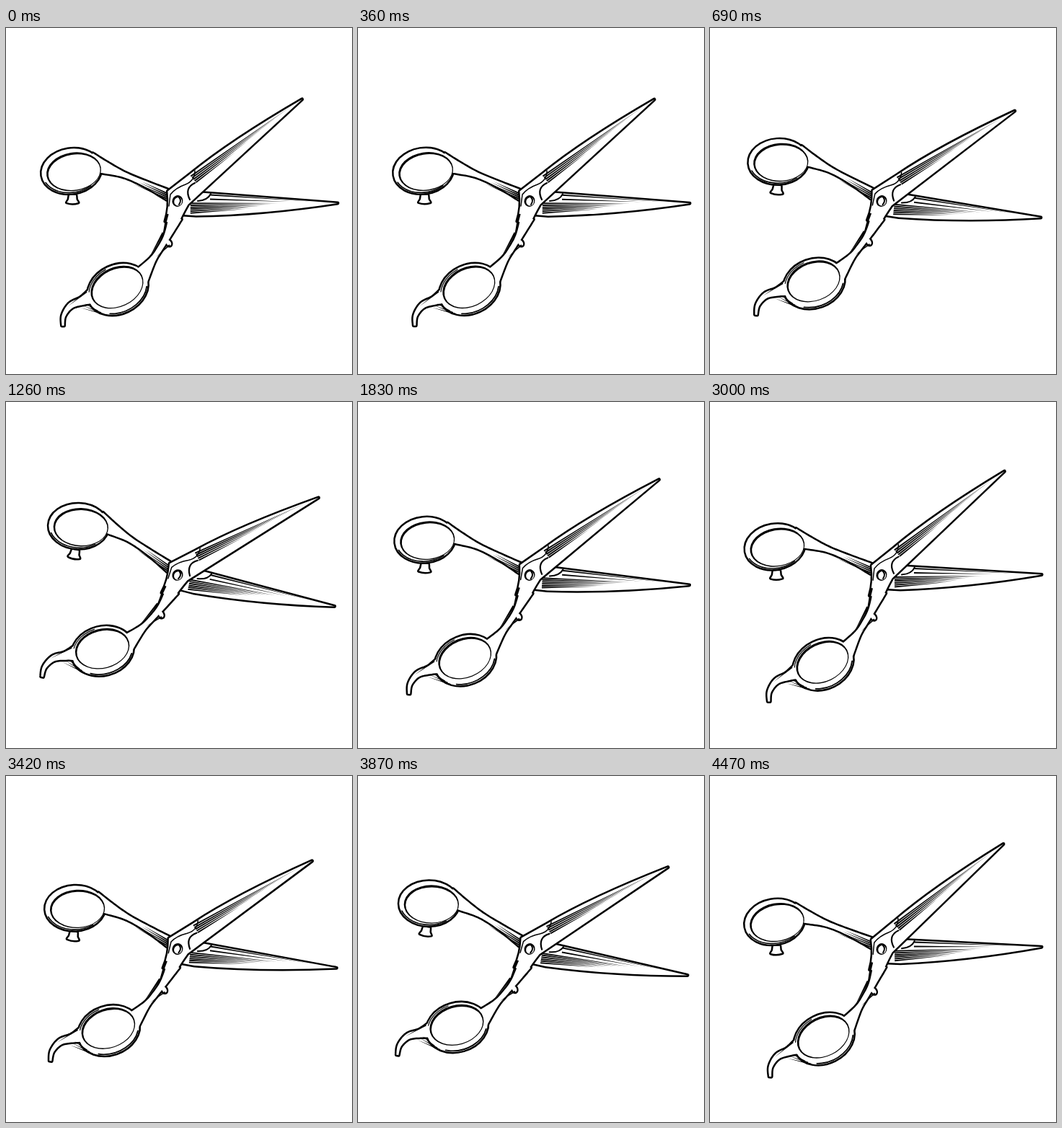
An HTML page with a canvas for the animation above (4500 ms loop, 480x480 px).

```html
<!DOCTYPE html>
<html>
<head>
<meta charset="utf-8">
<style>
html, body { margin: 0; width: 100%; height: 100%; overflow: hidden; background: #fff; }
canvas { display: block; width: 480px; height: 480px; }
</style>
</head>
<body>
<canvas id="stage" width="480" height="480"></canvas>
<script>
const ctx = document.getElementById('stage').getContext('2d');
const LOOP = 4500, STEP = 30, OUTLINE = 2.5;
const PIVOT = { x: 238, y: 240 };
const FRONT_ANGLE = -39.25, BACK_ANGLE = 0.77;
const rad = deg => deg * Math.PI / 180;

// Key poses of the sway: [ms, counter-clockwise degrees]
const SWAY = [
  [0, 0], [180, 1.3], [690, -5.2], [1080, -8.75], [1380, -11.1], [1620, -8.9], [1830, -2.85],
  [2300, 6.5], [2700, 3], [3000, 0.9], [3240, -2.55], [3710, -10], [4470, 1.5]
];

// Speed at a key pose; zero where the sway turns around
function speed(i) {
  const a = SWAY[i - 1], b = SWAY[i], c = SWAY[i + 1];
  if (!a || !c || (b[1] - a[1]) * (c[1] - b[1]) < 0) return 0;
  return (c[1] - a[1]) / (c[0] - a[0]);
}

function swayAt(t) {
  let i = 0;
  while (i < SWAY.length - 2 && t > SWAY[i + 1][0]) i++;
  const [t0, a] = SWAY[i], [t1, b] = SWAY[i + 1];
  const span = t1 - t0, u = (t - t0) / span, v = 1 - u;
  return v * v * (1 + 2 * u) * a + u * u * (3 - 2 * u) * b
    + span * u * v * (v * speed(i) - u * speed(i + 1));
}

function oval(x, y, rx, ry, deg, from = 0, to = 360) {
  const p = new Path2D();
  p.ellipse(x, y, rx, ry, rad(deg), rad(from), rad(to));
  return p;
}

function mix(a, b, c, d, u) {
  return b + u / 2 * (c - a + u * (2 * a - 5 * b + 4 * c - d + u * (3 * (b - c) + d - a)));
}

// Smooth band through [x, y, half width] knots
function band(...knots) {
  const at = s => {
    const i = Math.min(Math.floor(s), knots.length - 2);
    const k = n => knots[Math.max(0, Math.min(knots.length - 1, i + n))];
    return [0, 1, 2].map(c => mix(k(-1)[c], k(0)[c], k(1)[c], k(2)[c], s - i));
  };
  const left = [], right = [], end = knots.length - 1;
  for (let s = 0; s <= end + 0.01; s += 0.1) {
    const [x, y, w] = at(Math.min(s, end));
    const [ax, ay] = at(Math.max(0, s - 0.05)), [bx, by] = at(Math.min(end, s + 0.05));
    const dir = Math.atan2(by - ay, bx - ax);
    left.push([x + w * Math.sin(dir), y - w * Math.cos(dir)]);
    right.unshift([x - w * Math.sin(dir), y + w * Math.cos(dir)]);
  }
  const p = new Path2D();
  left.concat(right).forEach(q => p.lineTo(...q));
  p.closePath();
  return p;
}

// Blade drawn along the x axis from the pivot
function blade(angle, d) {
  const p = new Path2D();
  p.addPath(new Path2D(d), new DOMMatrix().translate(PIVOT.x, PIVOT.y).rotate(angle));
  return p;
}

const back = {
  blade: blade(BACK_ANGLE, 'M0-14L32-12L222 0Q120 17 26 20L8 19Z'),
  arm: band([116, 186, 13], [138, 194, 8], [165, 204, 3.5], [195, 217, 4], [226, 232, 7]),
  ring: oval(90.5, 198.5, 41.3, 31, -9),
  knob: new Path2D('M88 232L87 238L84.5 242Q92 244.5 100 242L97.5 238L97 232Z')
};

const front = {
  blade: blade(FRONT_ANGLE, 'M-2-19L38-18Q110-18 223 0L8 13Q-10 20-21 26L-31 11Q-14 0-2-19Z'),
  shank: band([235, 262, 9], [224, 288, 4.5], [213, 307, 3.5], [203, 322, 4.5], [186, 346, 12]),
  bump: oval(225.5, 298, 4.5, 3, 55),
  ring: oval(155, 362.5, 43, 33.5, -25),
  tail: band([79, 413, 1.5], [80, 399, 2.5], [90, 385, 4], [107, 378, 6], [128, 368, 14])
};

function solid(shapes) {
  ctx.lineWidth = 2 * OUTLINE;
  shapes.forEach(s => ctx.stroke(s));
  paint('#fff', ...shapes);
}

function paint(color, ...shapes) {
  ctx.fillStyle = color;
  shapes.forEach(s => ctx.fill(s));
  ctx.fillStyle = '#000';
}

function line(path, width) {
  ctx.lineWidth = width;
  ctx.stroke(typeof path === 'string' ? new Path2D(path) : path);
}

// Opening with a heavier rim at the upper left
function hole(x, y, rx, ry, deg) {
  paint('#000', oval(x, y, rx, ry, deg));
  paint('#fff', oval(x + 0.7, y + 0.8, rx - 2, ry - 2.2, deg));
}

// Hatch stroke that narrows to a point
function taper(x0, y0, x1, y1, w) {
  const dir = Math.atan2(y1 - y0, x1 - x0);
  const nx = -Math.sin(dir) * w / 2, ny = Math.cos(dir) * w / 2;
  ctx.beginPath();
  ctx.moveTo(x0 + nx, y0 + ny);
  ctx.lineTo(x1, y1);
  ctx.lineTo(x0 - nx, y0 - ny);
  ctx.fill();
}

// Hatching that runs towards the blade tip
function hatch(angle, count, x, y, gap, reach, shrink) {
  ctx.save();
  ctx.translate(PIVOT.x, PIVOT.y);
  ctx.rotate(rad(angle));
  for (let i = 0; i < count; i++) {
    const y0 = y + i * gap, x1 = reach - i * shrink;
    taper(x, y0, x1, y0 * (1 - x1 / 235), 2);
  }
  ctx.restore();
}

function drawBack() {
  solid([back.knob]);
  solid([back.blade, back.arm, back.ring]);
  hole(94, 199.3, 38.2, 26.7, -9);
  line(oval(91, 198.5, 40.5, 29.8, -9, 55, 160), 1.6);
  for (let i = 0; i < 4; i++) taper(225, 230 + i * 2.5, 188 - i * 4, 213 + i, 2);
  line('M284 230Q280 239 266 240', 2);
  hatch(BACK_ANGLE, 6, 18, 3, 2.7, 140, 9);
  hatch(BACK_ANGLE, 2, 45, -9, 6, 185, 30);
}

function drawFront() {
  solid([front.blade, front.shank, front.bump, front.tail, front.ring]);
  hole(154, 359.5, 38.3, 27.6, -25);
  line(oval(155, 362.5, 42, 32, -25, 25, 125), 1.8);
  line(oval(155, 362.5, 41.5, 32, -25, 205, 265), 1.2);
  for (let i = 0; i < 3; i++) taper(136 - i * 4, 397 - i * 2, 103 + i * 3, 388 - i * 3, 1.8);
  taper(112, 366, 86, 386, 2);

  hatch(FRONT_ANGLE, 5, 36, -15, 2.8, 205, 25);
  line('M262 198Q262 212 249 217Q235 222 228 231L226 247', 1.5);
  line('M262 215Q247 222 255 238', 2.2);
  taper(224, 258, 216, 295, 3.5);
  taper(218, 284, 197, 322, 3);
  taper(227, 301, 208, 318, 2);

  hole(238, 240, 7.4, 8, 20);
  line('M240 235Q244 239 240 245', 2);
}

function frame(now) {
  const t = Math.floor(now % LOOP / STEP) * STEP;
  ctx.setTransform(1, 0, 0, 1, 0, 0);
  ctx.fillStyle = '#fff';
  ctx.fillRect(0, 0, 480, 480);
  ctx.strokeStyle = ctx.fillStyle = '#000';
  ctx.lineJoin = ctx.lineCap = 'round';
  ctx.translate(PIVOT.x, PIVOT.y);
  ctx.rotate(-rad(swayAt(t)));
  ctx.translate(-PIVOT.x, -PIVOT.y);
  drawBack();
  drawFront();
}

const start = performance.now();
function tick() {
  frame(performance.now() - start);
  requestAnimationFrame(tick);
}
tick();
</script>
</body>
</html>
```
